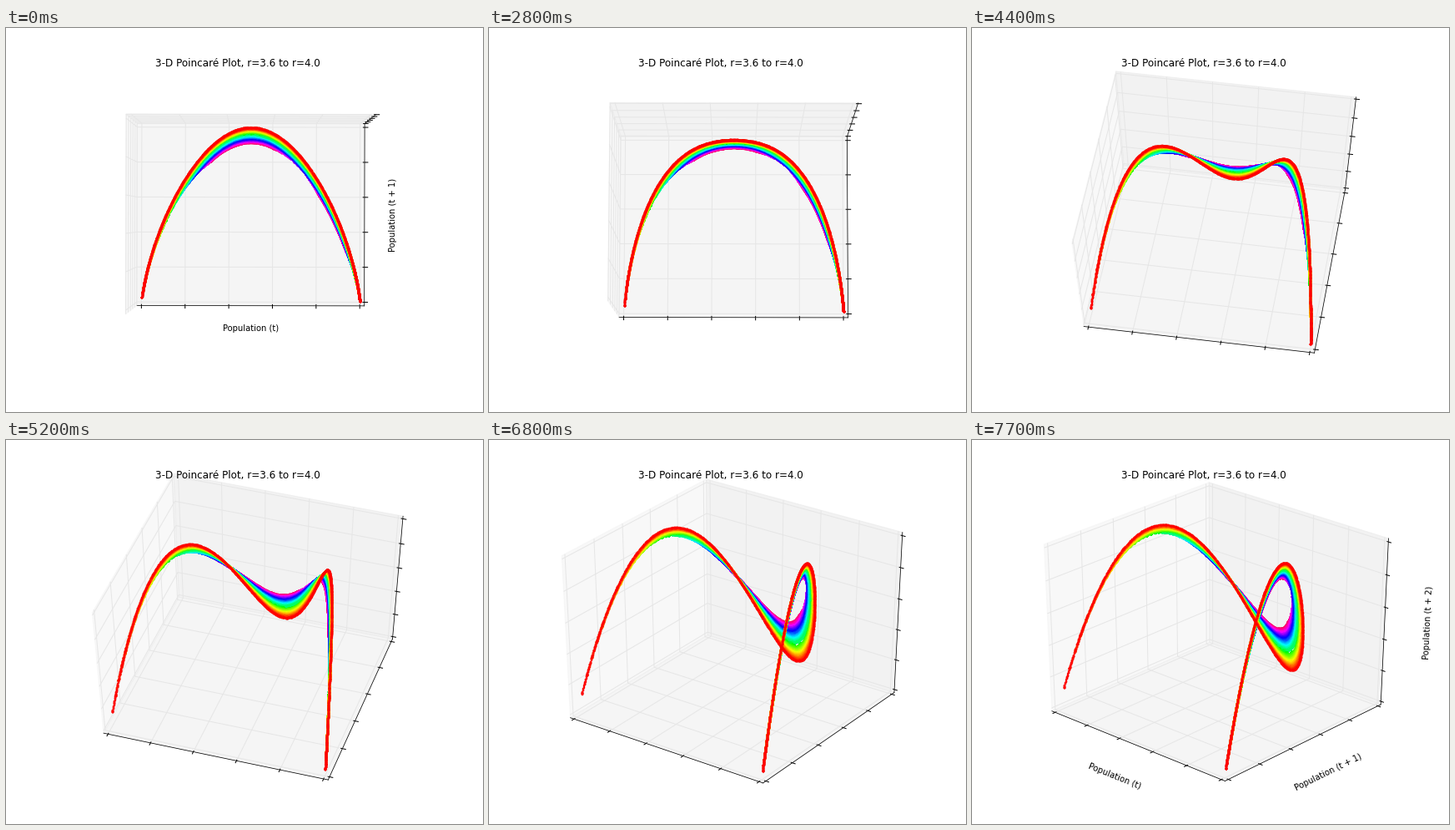
Write a matplotlib script that moves like this. It is 572x460 px and loops after 10000 ms.

```python
import math

import matplotlib.pyplot as plt
import numpy as np
from matplotlib.animation import FuncAnimation
from matplotlib.collections import LineCollection
from matplotlib.patches import Polygon
from matplotlib.path import Path

W, H, DPI = 572, 460, 64
PX = 72 / DPI                       # points per pixel
DIST = 11.0                         # camera distance from the cube centre
CX, CY = 293.54, 223.4              # cube centre on the stage
SX, SY = 558 / 0.185, 446.4 / 0.185
LO, HI = -1 / 48, 1 + 1 / 48        # cube faces lie just outside the data range
DELTA = 1 / 12
TICKS = np.linspace(0, 1, 6)
FRAMES, MOVE, STOP = 100, 20, 77
LABEL_DROP = 1.2                    # labels sit slightly below their anchor
DOT_R = 1.2

# (first, last + 1, elevation drop, azimuth gain) per frame
PANS = [(20, 23, 0.5, 0.0), (23, 37, 1.0, 0.0), (37, 61, 1.5, 1.1),
        (61, 65, 1.0, 1.1), (65, 74, 0.5, 1.1), (74, 77, 0.2, 0.5)]

plt.rcParams["font.family"] = "DejaVu Sans"


def camera(n):
    elev, azim = 89.9, 270.1
    for first, end, drop, gain in PANS:
        steps = min(max(n - first + 1, 0), end - first)
        elev -= drop * steps
        azim += gain * steps
    return math.radians(elev), math.radians(azim)


def project(pts, elev, azim):
    """Perspective view of (..., 3) points in stage pixels."""
    ce, se, ca, sa = math.cos(elev), math.sin(elev), math.cos(azim), math.sin(azim)
    view = np.array([[-sa, ca, 0], [-se * ca, -se * sa, ce], [ce * ca, ce * sa, se]])
    q = (np.asarray(pts) - 0.5) @ view.T
    depth = DIST - q[..., 2]
    return np.stack([CX + SX * q[..., 0] / depth, CY - SY * q[..., 1] / depth], axis=-1)


def logistic(rates, count, start=0.5):
    pops = np.empty((count, len(rates)))
    pops[0] = start
    for t in range(count - 1):
        pops[t + 1] = pops[t] * rates * (1 - pops[t])
    return pops


def put(point, axis, value):
    out = np.array(point, float)
    out[axis] = value
    return out


class AxisView:
    """Pane, edge line, grid, ticks and label of one axis of the cube."""
    BACK = np.array([LO, HI, LO])   # where the three visible panes meet

    def __init__(self, ax, i, start, tick_dir, sign, shade, text):
        a, b = (i + 1) % 3, (i + 2) % 3
        flip = lambda p, k: put(p, k, LO + HI - p[k])
        start = np.array(start)
        end = flip(start, i)
        self.edge_pts = np.array([start, end])

        self.pane_pts = np.array([self.BACK, flip(self.BACK, a),
                                  flip(flip(self.BACK, a), b), flip(self.BACK, b)])
        self.grid_pts = np.array([[put(flip(self.BACK, a), i, t), put(self.BACK, i, t),
                                   put(flip(self.BACK, b), i, t)] for t in TICKS])
        base = start[tick_dir]
        self.tick_pts = np.array([[put(put(start, i, t), tick_dir, base + k * sign * DELTA)
                                   for k in (0.1, -0.2)] for t in TICKS])
        mid = (start + end) / 2
        self.label_pt = mid + 1.6 * DELTA * np.sign(np.round(mid - 0.5, 6))

        rgba = (shade, shade, shade, 0.5)
        self.pane = Polygon(np.zeros((4, 2)), fc=rgba, ec=rgba, lw=PX, zorder=1)
        ax.add_patch(self.pane)
        z = 2 + i * 0.3
        self.edge, = ax.plot([], [], color="k", lw=0.75 * PX, zorder=z)
        self.grid = LineCollection([], colors="0.9", linewidths=PX, zorder=z + 0.1)
        self.ticks = LineCollection([], colors="k", linewidths=PX, zorder=z + 0.2)
        ax.add_collection(self.grid)
        ax.add_collection(self.ticks)
        self.label = ax.text(0, 0, text, fontsize=10 * PX, ha="center", va="center", zorder=9)

    def update(self, view, show_label):
        self.pane.set_xy(project(self.pane_pts, *view))
        edge = project(self.edge_pts, *view)
        self.edge.set_data(edge.T)
        self.grid.set_segments(project(self.grid_pts, *view))
        self.ticks.set_segments(project(self.tick_pts, *view))
        dx, dy = edge[1] - edge[0]
        angle = math.atan2(-dy, dx) % math.pi
        if angle > math.pi / 2:
            angle -= math.pi
        down = LABEL_DROP * np.array([math.sin(angle), math.cos(angle)])
        self.label.set_rotation(math.degrees(angle))
        self.label.set_position(project(self.label_pt, *view) + down)
        self.label.set_visible(show_label)


fig = plt.figure(figsize=(W / DPI, H / DPI), dpi=DPI, facecolor="white")
ax = fig.add_axes([0, 0, 1, 1])
ax.set_xlim(0, W)
ax.set_ylim(H, 0)
ax.axis("off")
ax.text(278, 46, "3-D Poincaré Plot, r=3.6 to r=4.0", fontsize=12 * PX,
        ha="center", va="baseline", zorder=9)

sides = [AxisView(ax, 0, (LO, LO, LO), 1, 1, 0.95, "Population (t)"),
         AxisView(ax, 1, (HI, HI, LO), 0, -1, 0.90, "Population (t + 1)"),
         AxisView(ax, 2, (HI, HI, LO), 0, -1, 0.925, "Population (t + 2)")]

rates = 3.6 + 0.008 * np.arange(50)
pops = logistic(rates, 1600)
cloud = np.stack([pops[:-2], pops[1:-1], pops[2:]], axis=-1)
colors = plt.cm.hsv(np.linspace(0.95, 0, len(rates)))

# Markers land on pixel corners, so the dot is drawn half a pixel off its anchor
dot = Path.circle((0.5, -0.5), DOT_R)
dots = [ax.plot([], [], ls="none", marker=dot, color=c, ms=2 * (DOT_R + 0.5) * PX,
                mew=0, zorder=4 + k * 0.01)[0]
        for k, c in enumerate(colors)]


def draw(n):
    view = camera(n)
    still = n < MOVE or n >= STOP
    for i, side in enumerate(sides):
        side.update(view, still and (i < 2 or n >= STOP))
    xy = project(cloud, *view) - 0.5
    for k, line in enumerate(dots):
        line.set_data(xy[:, k, 0], xy[:, k, 1])
    return []


def reset():
    return draw(0)


anim = FuncAnimation(fig, draw, frames=FRAMES, init_func=reset, interval=100,
                     repeat=True, repeat_delay=0, blit=False)
plt.show()
```
